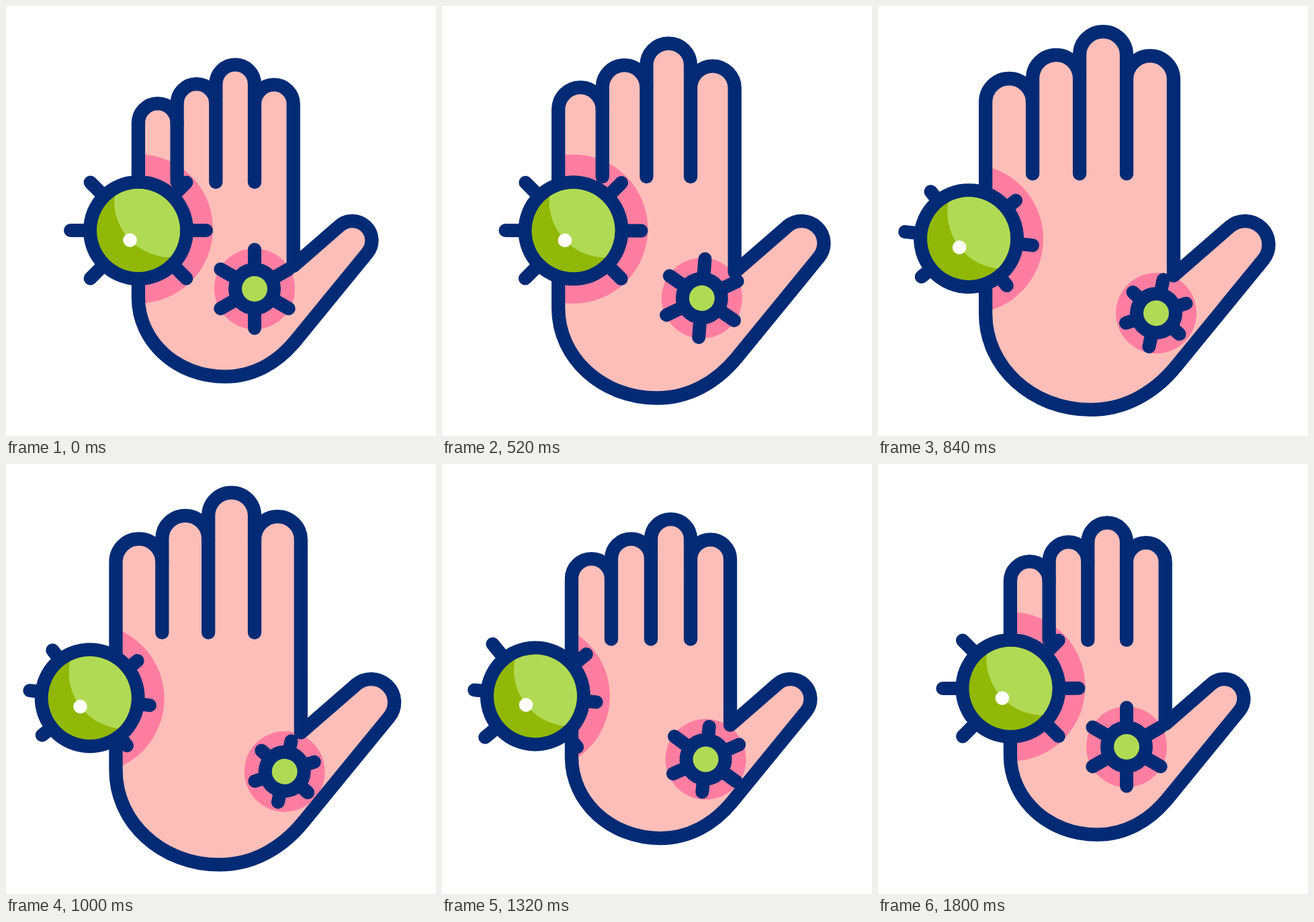
An HTML page for the animation above (2040 ms loop, 640x640 px).

```html
<!DOCTYPE html>
<html lang="en">
<head>
<meta charset="utf-8">
<title>Germs on a hand</title>
<style>
  @property --grow { syntax: "<number>"; inherits: true; initial-value: 1; }
  @property --big { syntax: "<number>"; inherits: true; initial-value: 0; }
  @property --small { syntax: "<number>"; inherits: true; initial-value: 0; }
  @property --tuck { syntax: "<number>"; inherits: false; initial-value: 0; }

  html, body { margin: 0; width: 100%; height: 100%; overflow: hidden; background: #fff; }

  svg {
    --navy: #032b75;
    --skin: #fdbeb9;
    --sore: #ff7da1;
    --lime: #b1da54;
    --olive: #91b806;
    display: block;
    width: 100%;
    height: 100%;
    animation: grow 2040ms infinite, big 2040ms infinite, small 2040ms infinite;
  }

  /* The hand scales while its outline keeps a constant weight. */
  .hand {
    transform-origin: 370px 320px;
    transform: scale(var(--grow));
  }
  .skin { fill: var(--skin); }
  .outline, .spike {
    fill: none;
    stroke: var(--navy);
    stroke-linecap: round;
    stroke-linejoin: round;
  }
  .outline { stroke-width: calc(20.3px / var(--grow)); }

  .sore { fill: var(--sore); }
  .shell { fill: var(--navy); }
  .lime { fill: var(--lime); }
  .olive { fill: var(--olive); }

  .big-sore {
    transform: translate(calc(197px - 73px * var(--big)), calc(331.5px + 17.8px * var(--big)));
  }
  .big {
    --depth: -11px;
    transform: translate(calc(197px - 73px * var(--big)), calc(334px + 14.3px * var(--big)))
               rotate(calc(7.1deg * var(--big)));
  }
  .small {
    --depth: -12px;
    transform: translate(calc(370px + 45px * var(--small)), calc(421px + 37px * var(--small)))
               rotate(calc(12.3deg * var(--small)));
  }

  /* Spikes slide under the shell, each with its own delay. */
  .spike {
    stroke-width: 20px;
    transform: rotate(var(--a)) translateX(calc(var(--depth) * var(--tuck)));
    animation: tuck 2040ms var(--d) infinite;
  }

  @keyframes grow {
    0% { --grow: 1; animation-timing-function: cubic-bezier(.68, -.15, .47, 1); }
    40.49% { --grow: 1.2125; animation-timing-function: cubic-bezier(.53, 0, .32, 1.15); }
    79.8%, 100% { --grow: 1; }
  }
  @keyframes big {
    0% { --big: 0; }
    15.49% { --big: 0; animation-timing-function: cubic-bezier(.7, -.15, .38, 1); }
    52.35% { --big: 1; animation-timing-function: cubic-bezier(.62, 0, .3, 1.15); }
    89.31%, 100% { --big: 0; }
  }
  @keyframes small {
    0% { --small: 0; }
    6.08% { --small: 0; animation-timing-function: cubic-bezier(.6, -.12, .45, 1); }
    46.18% { --small: 1; animation-timing-function: cubic-bezier(.55, 0, .4, 1.12); }
    86.27%, 100% { --small: 0; }
  }
  @keyframes tuck {
    0% { --tuck: 0; }
    24.51% { --tuck: 0; animation-timing-function: cubic-bezier(.333, 0, .667, 1); }
    39.22% { --tuck: 1; }
    52.45% { --tuck: 1; animation-timing-function: cubic-bezier(.333, 0, .667, 1); }
    67.16%, 100% { --tuck: 0; }
  }
</style>
</head>
<body>
<svg viewBox="0 0 640 640">
  <defs>
    <path id="palm" d="M196.9 434 V174 a28.85 28.85 0 0 1 57.7 0
      V145 a28.85 28.85 0 0 1 57.7 0
      V116.3 a28.85 28.85 0 0 1 57.7 0
      V146 a28.85 28.85 0 0 1 57.7 0
      V387 L496.5 327.1 A29 29 0 0 1 537.9 367.4
      L430.3 499 C403 532 367 551.7 326 551.7
      C254 551.7 196.9 499 196.9 434 Z"/>
    <clipPath id="inside"><use href="#palm" class="hand"/></clipPath>
    <clipPath id="disc"><circle r="62"/></clipPath>
  </defs>

  <use href="#palm" class="hand skin"/>
  <g clip-path="url(#inside)">
    <circle class="sore big-sore" r="111"/>
    <circle class="sore small" r="60"/>
  </g>
  <use href="#palm" class="hand outline"/>
  <path class="hand outline" d="M254.6 174 V262 M312.3 145 V262 M370 146 V262"/>

  <g class="big">
    <path class="spike" style="--a:0deg;--d:190ms" d="M60 0 H101"/>
    <path class="spike" style="--a:45deg;--d:50ms" d="M60 0 H101"/>
    <path class="spike" style="--a:135deg;--d:80ms" d="M60 0 H101"/>
    <path class="spike" style="--a:180deg;--d:190ms" d="M60 0 H101"/>
    <path class="spike" style="--a:225deg;--d:0ms" d="M60 0 H101"/>
    <path class="spike" style="--a:315deg;--d:50ms" d="M60 0 H101"/>
    <circle class="shell" r="82"/>
    <circle class="olive" r="62"/>
    <g clip-path="url(#disc)"><circle class="lime" cx="48" cy="-44" r="84"/></g>
    <circle cx="-12.5" cy="14.5" r="10.3" fill="#fff"/>
  </g>

  <g class="small">
    <path class="spike" style="--a:30deg;--d:30ms" d="M30 0 H58.5"/>
    <path class="spike" style="--a:90deg;--d:165ms" d="M30 0 H58.5"/>
    <path class="spike" style="--a:150deg;--d:90ms" d="M30 0 H58.5"/>
    <path class="spike" style="--a:210deg;--d:0ms" d="M30 0 H58.5"/>
    <path class="spike" style="--a:270deg;--d:165ms" d="M30 0 H58.5"/>
    <path class="spike" style="--a:330deg;--d:70ms" d="M30 0 H58.5"/>
    <circle class="shell" r="39"/>
    <circle class="lime" r="19"/>
  </g>
</svg>
</body>
</html>
```
